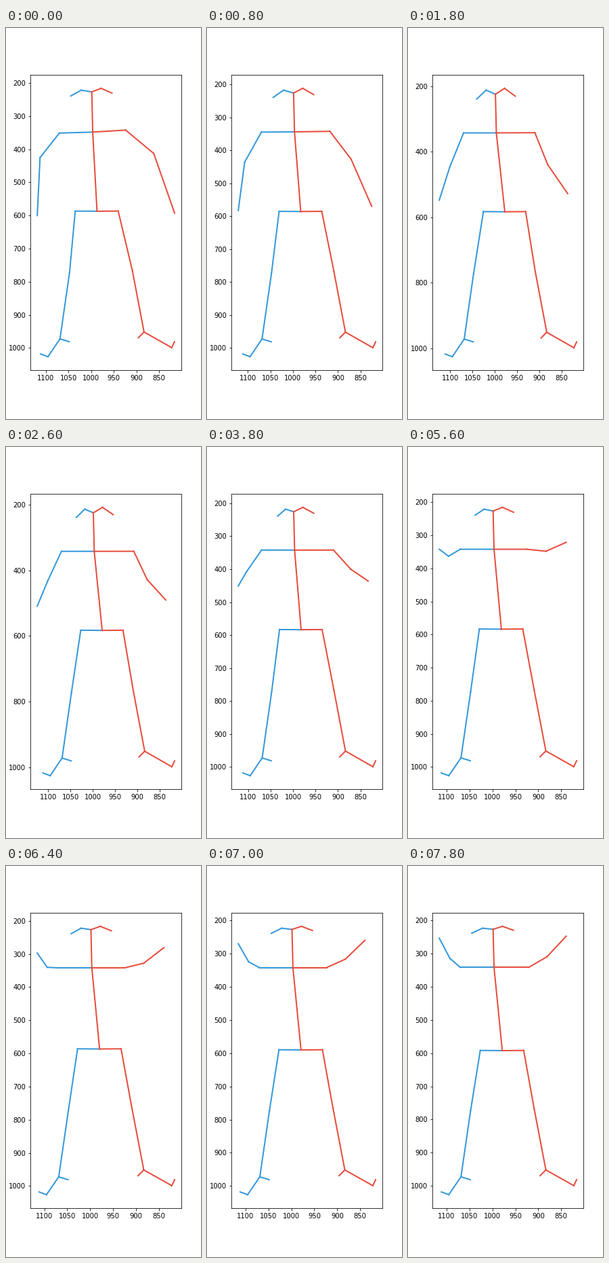
Write a matplotlib script that moves like this. It is 288 by 576 pixels and loops after 8000 ms.

```python
import numpy as np
import matplotlib.pyplot as plt
from matplotlib.animation import FuncAnimation

BLUE, RED = "#3498db", "#e74c3c"
FRAMES, INTERVAL = 40, 200
HOLDS = (8, 17, 26)             # frames that repeat the one before
KEYS = (0, 8, 17, 25, 36)       # pose steps of the key points

REST = {
    "nose": (998.5, 224.3), "neck": (996.5, 342), "mid_hip": (980, 583.5),
    "l_eye": (1019, 212), "l_ear": (1039.5, 239),
    "r_eye": (978, 206.4), "r_ear": (954, 230.3),
    "l_shoulder": (1070, 342), "r_shoulder": (910, 342),
    "l_hip": (1028, 583), "l_knee": (1047.6, 773), "l_ankle": (1068.6, 972.5),
    "l_toe": (1095.2, 1026.3), "l_small_toe": (1111.4, 1018), "l_heel": (1048.3, 981),
    "r_hip": (933.3, 583), "r_knee": (909, 767), "r_ankle": (883.4, 951.7),
    "r_toe": (822.5, 999), "r_small_toe": (816.3, 981), "r_heel": (896, 969),
}
ARMS = {
    "l_elbow": [(1112.5, 425), (1100.5, 445), (1103, 407), (1095.6, 363), (1092.6, 315)],
    "l_wrist": [(1118.7, 600), (1124.6, 548), (1121.8, 451), (1116, 342), (1116, 254)],
    "r_elbow": [(862, 412.6), (881, 440), (871.6, 400), (883, 348), (881, 310)],
    "r_wrist": [(816, 593), (836.4, 528), (833, 436), (839, 321), (839, 248)],
}
EYE_DROP = (9.5, 0, 6, 9, 12)
RIGHT_SHRUG = (14, 0, 0, 15, 11)
HIP_SHIFT = [(7, 3.5), (-2.5, 0), (2, 0), (0.5, 0), (-1.5, 9)]


def limb_chains(side):
    return [[joint if joint in REST else f"{side}_{joint}" for joint in chain.split()]
            for chain in ("nose eye ear", "neck shoulder elbow wrist",
                          "mid_hip hip knee ankle toe small_toe", "ankle heel")]


BONES = [(pair, color)
         for chains, color in ((limb_chains("l"), BLUE),
                               (limb_chains("r"), RED),
                               ([["nose", "neck", "mid_hip"]], RED))
         for chain in chains
         for pair in zip(chain, chain[1:])]


def follow(points, step):
    """Smooth path through the key points, at rest at both ends."""
    points = np.array(points, float)
    slopes = np.gradient(points, KEYS, axis=0)
    slopes[[0, -1]] = 0
    i = np.searchsorted(KEYS[1:-1], step, side="right")
    span = KEYS[i + 1] - KEYS[i]
    t = (step - KEYS[i]) / span
    blend = points[i] + (points[i + 1] - points[i]) * t * t * (3 - 2 * t)
    return blend + span * t * (1 - t) * ((1 - t) * slopes[i] - t * slopes[i + 1])


def pose_at(step):
    pose = {name: np.array(point, float) for name, point in REST.items()}
    pose.update({name: follow(path, step) for name, path in ARMS.items()})

    eye_drop = follow(EYE_DROP, step)
    pose["l_eye"][1] += eye_drop
    pose["r_eye"][1] += eye_drop
    pose["nose"][1] += eye_drop / 4

    head_turn = np.cos(2 * np.pi * step / KEYS[-1])
    pose["l_ear"][0] += 5.5 * head_turn
    pose["l_eye"][0] += 2.5 * head_turn

    tilt = np.exp(-step / 3)
    pose["neck"][1] += 6 * tilt
    pose["l_shoulder"][1] += 9 * tilt
    pose["r_shoulder"][0] += follow(RIGHT_SHRUG, step)

    for name in ("l_hip", "mid_hip", "r_hip"):
        pose[name] += follow(HIP_SHIFT, step)
    return pose


def padded(values, pad=0.05):
    low, high = min(values), max(values)
    margin = pad * (high - low)
    return low - margin, high + margin


fig = plt.figure(figsize=(4, 8), dpi=72, facecolor="white")
ax = fig.add_axes([0.125, 0.125, 0.775, 0.755])
lines = [ax.plot([], [], color=color, lw=2)[0] for _, color in BONES]


def draw(frame):
    pose = pose_at(frame - sum(frame >= hold for hold in HOLDS))
    for line, (pair, _) in zip(lines, BONES):
        line.set_data(*zip(*(pose[name] for name in pair)))
    xs, ys = zip(*pose.values())
    ax.set_xlim(padded(xs)[::-1])
    ax.set_ylim(padded(ys)[::-1])
    return lines


anim = FuncAnimation(fig, draw, frames=FRAMES, interval=INTERVAL,
                     init_func=lambda: draw(0), repeat=True, repeat_delay=0)
plt.show()
```
